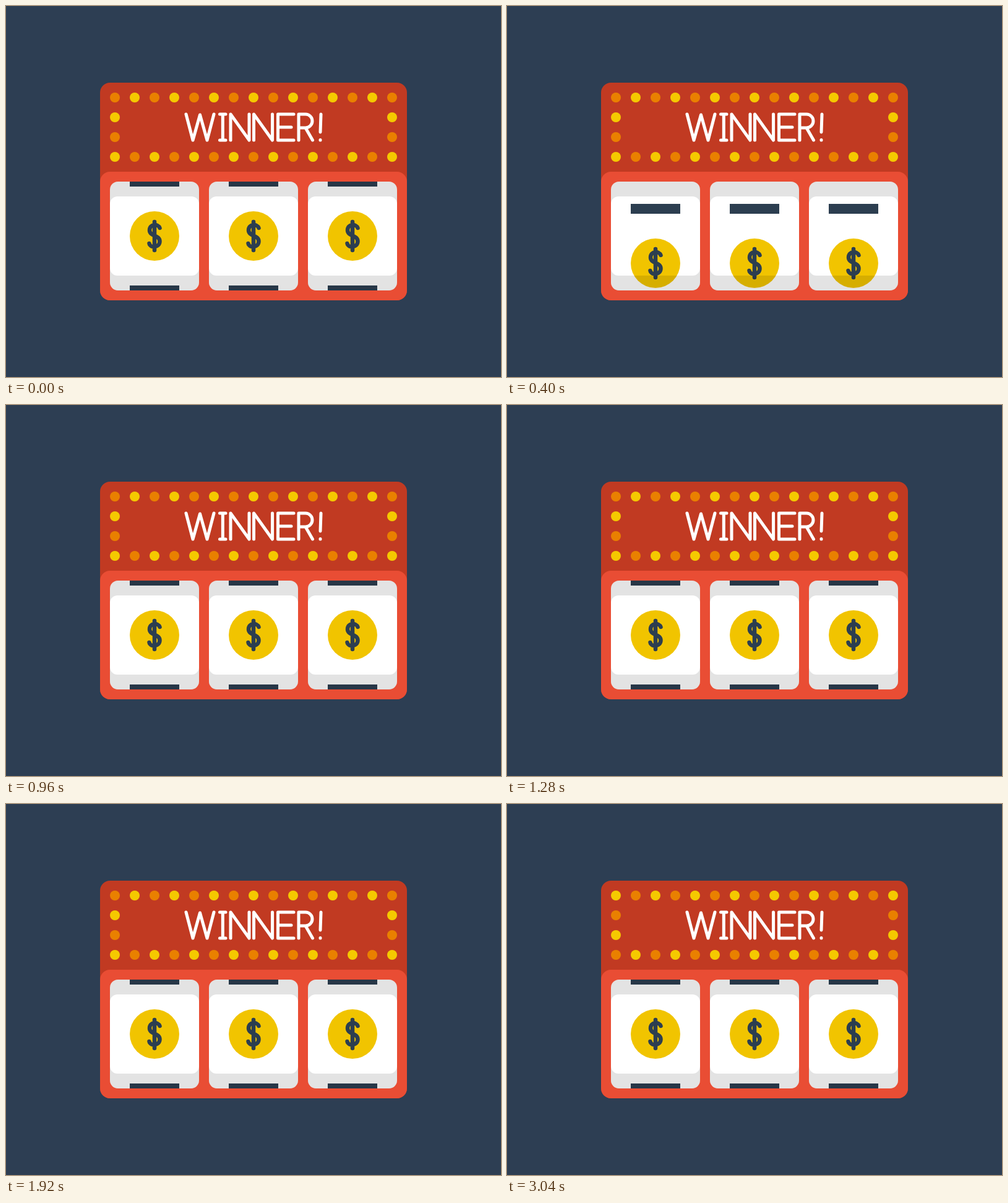
An HTML page for the animation above (3.2 s loop, 800 by 600 pixels).

```html
<!DOCTYPE html>
<html lang="en">
<head>
<meta charset="utf-8">
<title>Slot machine</title>
<style>
  html, body { margin: 0; width: 100%; height: 100%; overflow: hidden; background: #2d3e53; }
  svg { display: block; width: 100%; height: 100%; }
  .lettering, .dollar { fill: none; stroke-linecap: round; stroke-linejoin: round; }
  .lettering { stroke: #fff; stroke-width: 5; }
  .dollar { stroke: #2c3e50; stroke-width: 6.5; }
  .strip { animation: spin 3200ms infinite; }
  .bulb { fill: #e98000; animation: blink 320ms step-end infinite; }
  .bulb.lit { animation-name: blink-lit; }
  @keyframes spin {
    0% { transform: translateY(0); animation-timing-function: steps(24); }
    60% { transform: translateY(1056px); animation-timing-function: step-start; }
    60.001%, 100% { transform: translateY(0); }
  }
  @keyframes blink { 0% { fill: #e98000; } 50% { fill: #f5c900; } }
  @keyframes blink-lit { 0% { fill: #f5c900; } 50% { fill: #e98000; } }
</style>
</head>
<body>
<svg viewBox="0 0 800 600">
  <defs>
    <clipPath id="window"><rect x="-72" y="284" width="144" height="176" rx="13"/></clipPath>
    <g id="symbol">
      <rect x="-40" y="276" width="80" height="16" fill="#2c3e50"/>
      <g transform="translate(0 372)">
        <circle r="40" fill="#f1c400"/>
        <path class="dollar" d="M0-23V23M8.5-13C6-20-8-20-8-9.5C-8 1 8.5-2 8.5 8.5C8.5 19-7 20-8.5 12"/>
      </g>
    </g>
    <path id="shade" fill-opacity=".11" fill-rule="evenodd"
      d="M-72 284h144v176h-144zM-60 308h120a12 12 0 0 1 12 12v104a12 12 0 0 1-12 12h-120a12 12 0 0 1-12-12v-104a12 12 0 0 1 12-12z"/>
  </defs>

  <rect x="152" y="124" width="496" height="352" rx="16" fill="#c13a22"/>
  <rect x="152" y="268" width="496" height="208" rx="16" fill="#e94d34"/>
  <g id="bulbs"></g>

  <g class="lettering" role="img" aria-label="WINNER!">
    <path d="M291 175L302 217L313.500 176L325 217L336 175"/>
    <path d="M345.500 175H355M350.300 175V217M345.500 217H355"/>
    <path id="n" d="M363 217V175L393 217V175"/>
    <use href="#n" x="37.500"/>
    <path d="M465 175H439.500V217H465M439.500 196H461"/>
    <path d="M473 217V175H484A11 11 0 0 1 484 197H473M484 197L495.500 217"/>
    <path d="M509 175L508 204M508 216.500V217"/>
  </g>

  <g id="reels"></g>
</svg>
<script>
  const range = n => [...Array(n).keys()];

  const bulb = (col, row) =>
    `<circle class="bulb${(col + row) % 2 ? ' lit' : ''}" cx="${176 + 32 * col}" cy="${148 + 32 * row}" r="8"/>`;

  const isBorder = (col, row) => row % 3 === 0 || col % 14 === 0;

  document.getElementById('bulbs').innerHTML = range(4).flatMap(row =>
    range(15).filter(col => isBorder(col, row)).map(col => bulb(col, row))).join('');

  // One symbol below the window, the rest stacked above it for the spin.
  const strip = range(8).map(i => `<use href="#symbol" y="${176 * (1 - i)}"/>`).join('');

  document.getElementById('reels').innerHTML = [240, 400, 560].map(x => `
    <g transform="translate(${x} 0)"><g clip-path="url(#window)">
      <rect x="-72" y="284" width="144" height="176" fill="#fff"/>
      <g class="strip">${strip}</g>
      <use href="#shade"/>
    </g></g>`).join('');
</script>
</body>
</html>
```
